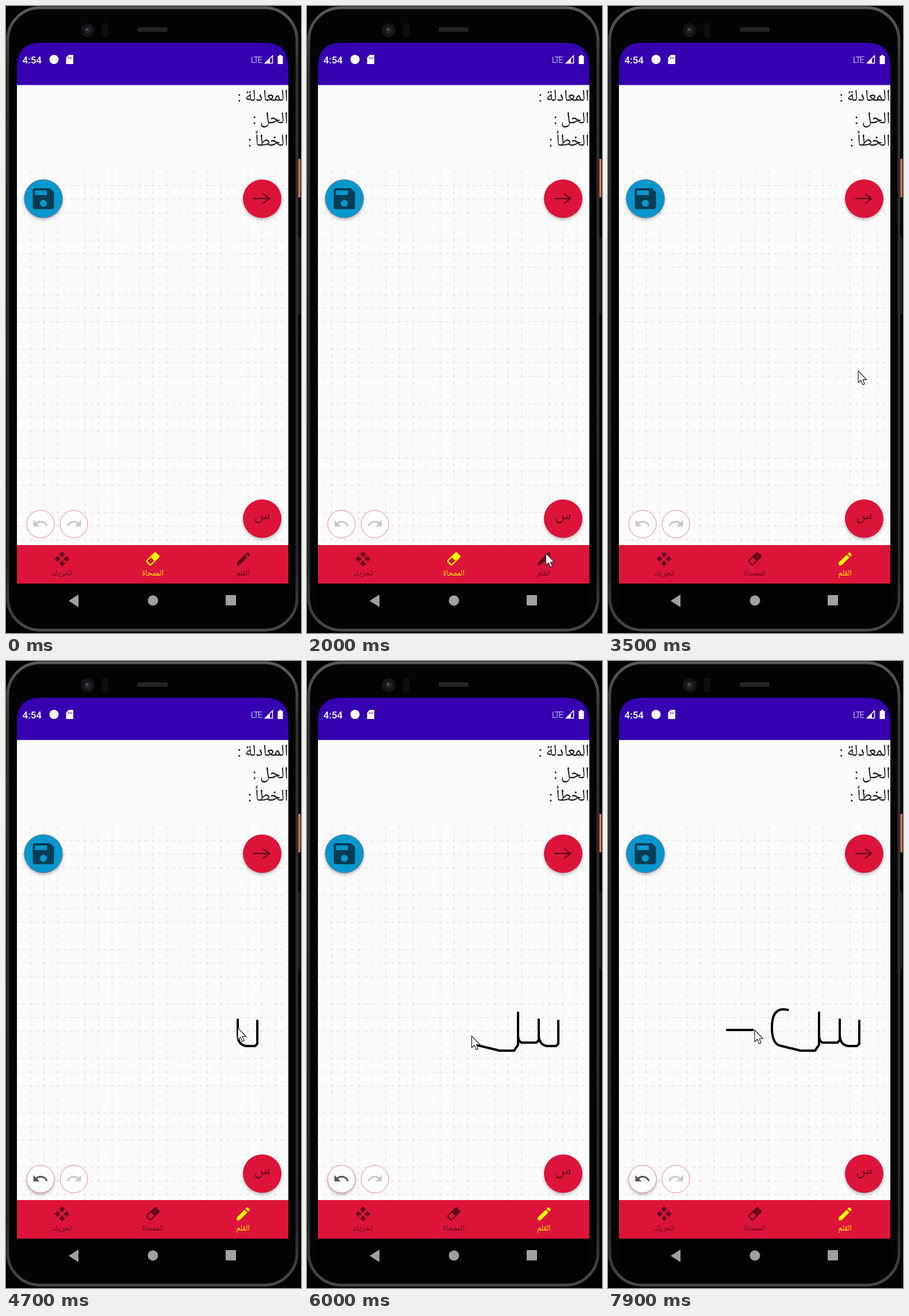
Recreate the animation shown at these times as an HTML page. Size 513 by 1091 pixels, loop 8 s.

```html
<!DOCTYPE html>
<html lang="ar">
<head>
<meta charset="utf-8">
<title>Handwriting app</title>
<style>
  html, body { margin: 0; width: 100%; height: 100%; overflow: hidden; background: #000; }
  svg { display: block; width: 100vw; height: 100vh; }
  .ar { direction: rtl; font-family: "Noto Naskh Arabic", "Noto Sans Arabic", "DejaVu Sans", sans-serif; }
  .mid { text-anchor: middle; }
  .status { font-family: Roboto, sans-serif; fill: #fff; }
  .fab { filter: drop-shadow(0 3px 2.5px rgba(0, 0, 0, .25)); }
  .ring { fill: #fdfdfd; stroke: #de5571; stroke-width: .7; }
  .tab { fill: #650a1d; }
  .tab.on { fill: #ff0; }
  .tab text { font-size: 14.5px; }
  .ink { fill: none; stroke: #000; stroke-width: 4; stroke-linecap: round; stroke-linejoin: round; }
</style>
</head>
<body>
<svg viewBox="0 0 513 1091" preserveAspectRatio="none">
  <defs>
    <clipPath id="screen"><path d="M19 1063V105Q19 64 60 64H450Q491 64 491 105V1063Z"/></clipPath>
    <clipPath id="bar"><rect x="19" y="938" width="472" height="67"/></clipPath>
    <linearGradient id="rim" x2="0" y2="1">
      <stop offset="0" stop-color="#5a5a5a"/>
      <stop offset=".1" stop-color="#303030"/>
      <stop offset=".9" stop-color="#262626"/>
      <stop offset="1" stop-color="#484848"/>
    </linearGradient>
    <path id="undoIcon" transform="translate(45.2 886) scale(1.22)" d="M12.5 8c-2.65 0-5.05 1-6.9 2.6L2 7v9h9l-3.6-3.6c1.4-1.2 3.1-1.9 5.1-1.9 3.5 0 6.5 2.3 7.6 5.5l2.4-.8C21 11 17 8 12.500 8z"/>
    <path id="arrow" d="M0 -13L6 -7H2.400V-3.500H-2.400V-7H-6Z"/>
  </defs>

  <!-- phone body -->
  <rect x="507" y="266" width="5" height="67" rx="1" fill="#d8745b"/>
  <rect x="508" y="402" width="4" height="134" rx="1" fill="#1c1c1c"/>
  <rect x="0" y="200" width="2" height="110" fill="#2b2b2b"/>
  <rect x="3" y="3" width="503" height="1083" rx="56" fill="#030303" stroke="url(#rim)" stroke-width="5"/>
  <circle cx="142" cy="42" r="12" fill="#151515"/>
  <circle cx="142" cy="42" r="6" fill="#25252a"/>
  <circle cx="141" cy="41" r="2" fill="#55555c"/>
  <rect x="167" y="30" width="11" height="24" rx="2" fill="#0e0e0e"/>
  <rect x="229" y="37" width="52" height="8" rx="3" fill="#242424"/>

  <g clip-path="url(#screen)">
    <rect x="19" y="64" width="472" height="74" fill="#3500b0"/>
    <rect x="19" y="137.500" width="472" height="801" fill="#fbfbfb"/>
    <path id="grid" fill="none" stroke="#dedede" stroke-dasharray="6 5.830"/>
    <rect x="19" y="938" width="472" height="67" fill="#dc143a"/>
    <rect x="19" y="1005" width="472" height="60" fill="#000"/>
  </g>

  <!-- status bar -->
  <text class="status" x="28.500" y="99.500" font-size="17" font-weight="500">4:54</text>
  <circle cx="83.500" cy="93" r="8" fill="#fff"/>
  <path d="M109 85H117V101H104.500V90Z" fill="#fff"/>
  <path d="M108.500 89v3m2.700-3v3m2.700-3v3" stroke="#3500b0"/>
  <text class="status" x="426" y="98.500" font-size="15" font-weight="300" letter-spacing="-1.500">LTE</text>
  <path d="M463.500 86.500V99.500H450.500Z" fill="none" stroke="#fff" stroke-width="1.500"/>
  <path d="M459 91V100H450Z" fill="#fff"/>
  <path d="M475 85H479V87H481.500V101H472.500V87H475Z" fill="#fff"/>

  <g class="ar" font-size="29" fill="#1a1a1a">
    <text x="491" y="165">المعادلة :</text>
    <text x="491" y="204">الحل :</text>
    <text x="491" y="243">الخطأ :</text>
  </g>

  <g id="inks"></g>

  <!-- floating buttons -->
  <g class="fab">
    <circle cx="65" cy="335.300" r="33.500" fill="#0797cc" stroke="#b0617c" stroke-width=".6"/>
    <circle cx="445.500" cy="335.300" r="33.500" fill="#dc143a"/>
    <circle cx="445.500" cy="892" r="33.500" fill="#dc143a"/>
  </g>
  <path d="M50.500 317H76.500L83.500 324V349.500q0 4-4 4H50.500q-4 0-4-4V321q0-4 4-4z" fill="#073d54"/>
  <rect x="50.500" y="321" width="20.500" height="8" fill="#0797cc"/>
  <circle cx="65" cy="343.300" r="6" fill="#0797cc"/>
  <path d="M430 335H458M447 326.500L458.500 335 447 343.500" fill="none" stroke="#650a1d" stroke-width="2.300"/>
  <text class="ar mid" x="445.500" y="893" font-size="28" fill="#650a1d">س</text>
  <circle id="undoRing" class="ring" cx="60" cy="901.500" r="24"/>
  <circle class="ring" cx="118" cy="901.500" r="24"/>
  <use id="undo" href="#undoIcon"/>
  <use href="#undoIcon" transform="translate(178 0) scale(-1 1)" fill="#c8c8c8"/>

  <!-- tabs -->
  <g clip-path="url(#bar)"><circle id="ripple" cx="412" cy="972" fill="#000"/></g>
  <g class="tab">
    <g transform="translate(97.500 962)">
      <use href="#arrow"/>
      <use href="#arrow" transform="rotate(90)"/>
      <use href="#arrow" transform="rotate(180)"/>
      <use href="#arrow" transform="rotate(270)"/>
    </g>
    <text class="ar mid" x="97" y="991">تحريك</text>
  </g>
  <g class="tab" id="eraser">
    <g transform="translate(255.300 962) rotate(-45)">
      <rect x="-12" y="-6" width="24" height="12" rx="3"/>
      <rect x="-9.500" y="-4" width="9" height="8" rx="1" fill="#dc143a"/>
    </g>
    <text class="ar mid" x="255" y="991">الممحاة</text>
  </g>
  <g class="tab" id="pen">
    <path transform="translate(412.500 962) rotate(-45)" d="M-16 0L-12.700 -3.350H7V3.350H-12.700ZM9 -3.350H12L13.500 -2V2L12 3.350H9Z"/>
    <text class="ar mid" x="412" y="991">القلم</text>
  </g>

  <g fill="#a0a0a0">
    <path d="M109 1035L126 1024V1046Z"/>
    <circle cx="255.500" cy="1034.500" r="9"/>
    <rect x="382" y="1025" width="18" height="18" rx="1"/>
  </g>

  <path id="cursor" d="M0 0V20.500L4.700 16.200 7.800 24 11.200 22.600 8.100 15.200H14.500Z" fill="#fafafa" stroke="#333" stroke-width="1.300" stroke-linejoin="round"/>
</svg>
<script>
const $ = id => document.getElementById(id);
const clamp = k => Math.min(1, Math.max(0, k));
const ease = k => (1 - Math.cos(Math.PI * clamp(k))) / 2;
const set = (el, attrs) => Object.entries(attrs).forEach(a => el.setAttribute(...a));

function addPath(parent, attrs) {
  const el = document.createElementNS('http://www.w3.org/2000/svg', 'path');
  set(el, attrs);
  return parent.appendChild(el);
}

// Pointer moves in order; those with ink leave a line behind
const moves = [
  { from: 850, to: 2200, d: 'M508 757L488 748Q430 800 414 966' },
  { from: 2650, to: 3600, d: 'M414 966L419 913Q424 680 437 626' },
  { from: 3700, to: 4500, ink: true, d: 'M437 626V666L433 670H418Q403 668 403 650V624' },
  { from: 4500, to: 5400, ink: true, d: 'M403 624V660L399 664H373Q367 662 367 650V612' },
  { from: 5400, to: 6350, ink: true, d: 'M367 612V668L360 678H335L298 669Q285 664 285 638Q285 606 305 606L313 607' },
  { from: 6400, to: 7300, d: 'M313 607Q290 640 207 642' },
  { from: 7600, to: 7900, ink: true, d: 'M207 642H255' }
];
const inkLag = 50;
for (const m of moves) {
  m.path = addPath($('inks'), { d: m.d, class: 'ink' });
  m.length = m.path.getTotalLength();
}
const travelled = (m, t) => m.length * ease((t - m.from) / (m.to - m.from));

// Every fourth grid line is left out
let grid = '';
for (let i = 0; i < 27; i++) {
  if (i % 4 === 3) continue;
  const x = 42.5 + i * 23.65, y = 312.5 + i * 23.7;
  if (x < 485) grid += `M${x} 286V938`;
  if (y < 935) grid += `M16 ${y}H484`;
}
set($('grid'), { d: grid });

function draw(now) {
  const t = Math.floor(now % 8000 / 100) * 100;
  const penOn = t >= 2800, canUndo = t >= 3800;
  $('pen').classList.toggle('on', penOn);
  $('eraser').classList.toggle('on', !penOn);
  $('undoRing').classList.toggle('fab', canUndo);
  set($('undo'), { fill: canUndo ? '#555' : '#c8c8c8' });

  const age = t - 2800;
  set($('ripple'), {
    r: 52 + 27 * clamp(age / 100),
    opacity: age < 0 ? 0 : .36 * clamp((500 - age) / 400)
  });

  for (const m of moves) {
    const drawn = m.ink ? travelled(m, t - inkLag) : 0;
    set(m.path, { 'stroke-dasharray': `${drawn} 999`, visibility: drawn ? 'visible' : 'hidden' });
  }

  const move = moves.filter(m => t >= m.from).pop();
  set($('cursor'), { visibility: move ? 'visible' : 'hidden' });
  if (move) {
    const { x, y } = move.path.getPointAtLength(travelled(move, t));
    set($('cursor'), { transform: `translate(${x} ${y})` });
  }
  requestAnimationFrame(() => draw(performance.now() - start));
}
const start = performance.now();
draw(0);
</script>
</body>
</html>
```
